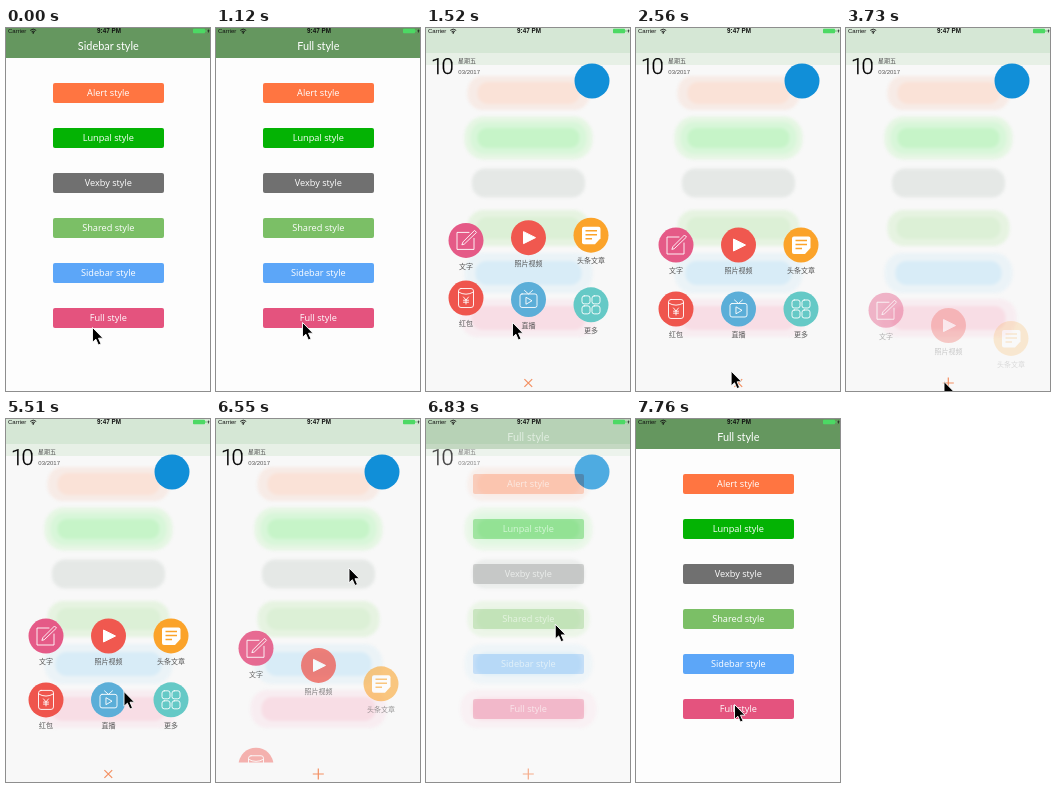
Recreate the animation shown at these times as an HTML page. Size 204x363 px, loop 8000 ms.

```html
<!DOCTYPE html>
<html lang="en">
<head>
<meta charset="utf-8">
<title>Menu styles</title>
<style>
  html, body { margin: 0; width: 100%; height: 100%; overflow: hidden; background: #fdfdfd; }
  svg { display: block; width: 204px; height: 363px; }
  .title { font: 10.9px Lato, sans-serif; fill: #fff; text-anchor: middle; }
  .button { font: 9.2px "Open Sans", sans-serif; fill: #fff; text-anchor: middle; }
  .status { font: 6px "Liberation Sans", sans-serif; fill: #111; }
  .clock { font-weight: bold; font-size: 6.3px; text-anchor: middle; }
  .day { font: 300 22px Roboto, sans-serif; letter-spacing: -1.6px; fill: #000; stroke: #000; stroke-width: .25; }
  .date { font: 6px "Liberation Sans", "Noto Sans CJK SC", sans-serif; fill: #555; }
  .label { font: 7px "Noto Sans CJK SC", "Noto Sans CJK", sans-serif; fill: #555; text-anchor: middle; }
  .line { fill: none; stroke: #fff; stroke-width: .9; stroke-linecap: round; stroke-linejoin: round; }
</style>
</head>
<body>
<svg viewBox="0 0 204 363">
  <defs>
    <clipPath id="menuClip"><rect width="204" height="343.5"/></clipPath>
    <filter id="soft" filterUnits="userSpaceOnUse" x="0" y="0" width="204" height="363"
            color-interpolation-filters="sRGB"><feGaussianBlur stdDeviation="1.8"/></filter>
  </defs>
  <rect width="204" height="363" fill="#fdfdfd"/>
  <rect width="204" height="30" fill="#65975f"/>
  <text id="title" class="title" x="102.3" y="22.3"></text>
  <g id="buttons"></g>

  <g id="overlay">
    <rect width="204" height="363" fill="#f8f8f8"/>
    <rect width="204" height="37" fill="#e7f0e6"/>
    <rect width="204" height="25" fill="#d5e7d5"/>
    <g id="blurs" filter="url(#soft)"></g>
    <text class="day" x="5" y="46">10</text>
    <text class="date" x="32" y="34.7">星期五</text>
    <text class="date" x="32.3" y="45.6">03/2017</text>
    <circle cx="166" cy="53" r="17.5" fill="#118fd8"/>
    <g id="items" clip-path="url(#menuClip)"></g>
    <path id="cross" d="M-5.5 0H5.5M0-5.5V5.5" stroke="#f39062" stroke-width="1.2"/>
  </g>

  <g class="status">
    <text x="2" y="5.3">Carrier</text>
    <g fill="none" stroke="#111" stroke-width=".9">
      <path d="M24.2 2.4Q27.2-.2 30.2 2.4M25.5 3.8Q27.2 2.4 28.9 3.8"/>
    </g>
    <circle cx="27.2" cy="4.9" r=".8"/>
    <text class="clock" x="103" y="5.4">9:47 PM</text>
    <rect x="187" y=".7" width="12" height="4.6" rx=".8" fill="#4cd964"/>
    <rect x="199.5" y="2" width=".9" height="2" fill="#4cd964"/>
    <path d="M202.8.7L201.3 3.2H202.4L201.8 5.4L203.6 2.6H202.4Z"/>
  </g>
  <path id="cursor" d="M.5.5V15.3L3.9 12.2L6.4 18L9 16.9L6.5 11.2H11Z"
        fill="#000" stroke="#fff" stroke-width=".9" stroke-linejoin="round"/>
</svg>

<script>
const LOOP = 8000;
const $ = id => document.getElementById(id);
const clamp = v => Math.max(0, Math.min(1, v));
const smooth = v => { const u = clamp(v); return u * u * (3 - 2 * u); };

const buttons = [
  ["Alert style", "#ff7541"], ["Lunpal style", "#04b304"], ["Vexby style", "#707070"],
  ["Shared style", "#7bbf66"], ["Sidebar style", "#5ca6f8"], ["Full style", "#e4537e"]
];
$("buttons").innerHTML = buttons.map(([name, fill], i) => {
  const y = 55 + 45 * i;
  return `<rect x="47" y="${y}" width="111" height="20" rx="2" fill="${fill}"/>
    <text class="button" x="102.3" y="${y + 13}">${name}</text>`;
}).join("");

// Blurred buttons: half width, half height, colour of each layer
const blurs = [
  [[61, 17, "#f7ebe6"], [51, 11, "#fae2d7"]],
  [[64, 21.5, "#e5f6e3"], [58, 16, "#d8f6d9"], [51, 10, "#c6f4c8"]],
  [[56.5, 14.5, "#e5e8e6"]],
  [[61, 18, "#e6f3e1"], [52, 11, "#dcf0d6"]],
  [[64, 20, "#ebf3f7"], [53, 12, "#d8ecf7"]],
  [[68, 19, "#f8edf1"], [57, 12, "#f8dde5"]]
];
$("blurs").innerHTML = blurs.map((layers, i) => layers.map(([w, h, fill]) =>
  `<rect x="${102.5 - w}" y="${65 + 45 * i - h}" width="${2 * w}" height="${2 * h}" rx="${h * .9}" fill="${fill}"/>`
).join("")).join("");

const tile = (x, y) => `<rect x="${x}" y="${y}" width="8" height="8" rx="2.2"/>`;
const items = [
  ["文字", "#e55a87",
    `<path class="line" d="M3-8H-9V9H8V-2M-4 4L-3 1.5L8.5-10L10.5-8L-1.5 3.5Z"/>`],
  ["照片视频", "#f0584f",
    `<path fill="#fff" stroke="#fff" stroke-linejoin="round" d="M-5-6L7 0L-5 6Z"/>`],
  ["头条文章", "#fba32a",
    `<path fill="#fff" d="M-7-8.5H7.5Q9.5-8.5 9.5-6.5V3L4 9H-7Q-9 9-9 7V-6.5Q-9-8.5-7-8.5Z"/>
     <path d="M-5.5-4.5H6M-5.5-.5H6M-5.5 3.5H1" stroke="#fba32a" stroke-width="1.5"/>`],
  ["红包", "#ef554d",
    `<g class="line"><rect x="-7.5" y="-9.5" width="15" height="19" rx="2.5"/>
     <path d="M-7.5-6Q0-1.5 7.5-6M-2.5-1L0 2L2.5-1M0 2V6M-2.5 2.2H2.5M-2.5 4.2H2.5"/></g>`],
  ["直播", "#5baed8",
    `<g class="line"><rect x="-8.5" y="-5.5" width="17" height="13.5" rx="2"/>
     <path d="M-4-9L0-5.5L4-9M-2.2-2L3.5 1.3L-2.2 4.6Z"/></g>`],
  ["更多", "#65c9c6",
    `<g class="line">${tile(-9, -9)}${tile(1, -9)}${tile(-9, 1)}${tile(1, 1)}</g>`]
];
$("items").innerHTML = items.map(([name, fill, glyph]) =>
  `<g><circle r="17.5" fill="${fill}"/>${glyph}<text class="label" y="28.3">${name}</text></g>`
).join("");
const itemNodes = [...$("items").children];

// Each menu cycle: first visible time, start of opening, start of closing
const cycles = [
  { show: 1350, open: 1200, close: 3450 },
  { show: 4820, open: 4650, close: 6360 }
];
const STAGGER = 30;

// Underdamped spring from 85 px below the resting place
function rise(ms) {
  const s = Math.max(0, ms) / 1000, w = 13.66, damp = 8.9;
  return 85 * Math.exp(-damp * s) * (Math.cos(w * s) + damp / w * Math.sin(w * s));
}
// Critically damped drop to 140 px below
function fall(ms) {
  const u = Math.max(0, ms) * .012;
  return 140 * (1 - (1 + u) * Math.exp(-u));
}

function drawMenu(t) {
  const c = cycles.find(c => t >= c.show && t < c.close + 680);
  $("overlay").style.display = c ? "" : "none";
  if (!c) return;
  const age = t - c.open, out = t - c.close;
  $("overlay").setAttribute("opacity", clamp(age / 300) * (1 - clamp((out - 400) / 270)));
  itemNodes.forEach((node, i) => {
    const dy = out > 0 ? fall(out - (5 - i) * STAGGER) : rise(age - i * STAGGER);
    const x = 40 + i % 3 * 62.5, y = (i < 3 ? 217 : 281) + dy;
    node.setAttribute("transform", `translate(${x} ${y})`);
    node.setAttribute("opacity", clamp(1 - dy / 115));
  });
  const turn = 45 * (smooth((age - 60) / 240) - smooth((out + 110) / 220));
  $("cross").setAttribute("transform", `translate(102.3 355) rotate(${turn})`);
}

// Pointer path: time, x, y
const path = [
  [0, 86, 299], [40, 86, 299], [290, 73, 292], [450, 73, 292], [700, 86, 294],
  [2190, 86, 294], [2720, 97, 356], [3000, 97, 356], [3080, 97, 355],
  [3500, 97, 355], [3730, 97.5, 353], [4120, 113, 323], [4340, 106.5, 287],
  [4820, 106.5, 287], [5150, 107, 287], [5510, 117.5, 272], [5620, 124, 245],
  [5900, 132.5, 148.5], [6550, 132.5, 148.5], [7060, 126, 246], [7580, 98, 286],
  [7740, 98, 286], [7760, 98, 285], [LOOP, 98, 285]
];
function drawCursor(t) {
  const i = path.findIndex(p => p[0] > t), [t0, x0, y0] = path[i - 1], [t1, x1, y1] = path[i];
  const k = smooth((t - t0) / (t1 - t0));
  $("cursor").setAttribute("transform", `translate(${x0 + (x1 - x0) * k} ${y0 + (y1 - y0) * k})`);
}

function draw(t) {
  $("title").textContent = t < 1120 ? "Sidebar style" : "Full style";
  drawMenu(t);
  drawCursor(t);
}

const start = performance.now();
function tick() {
  draw((performance.now() - start) % LOOP);
  requestAnimationFrame(tick);
}
draw(0);
requestAnimationFrame(tick);
</script>
</body>
</html>
```
